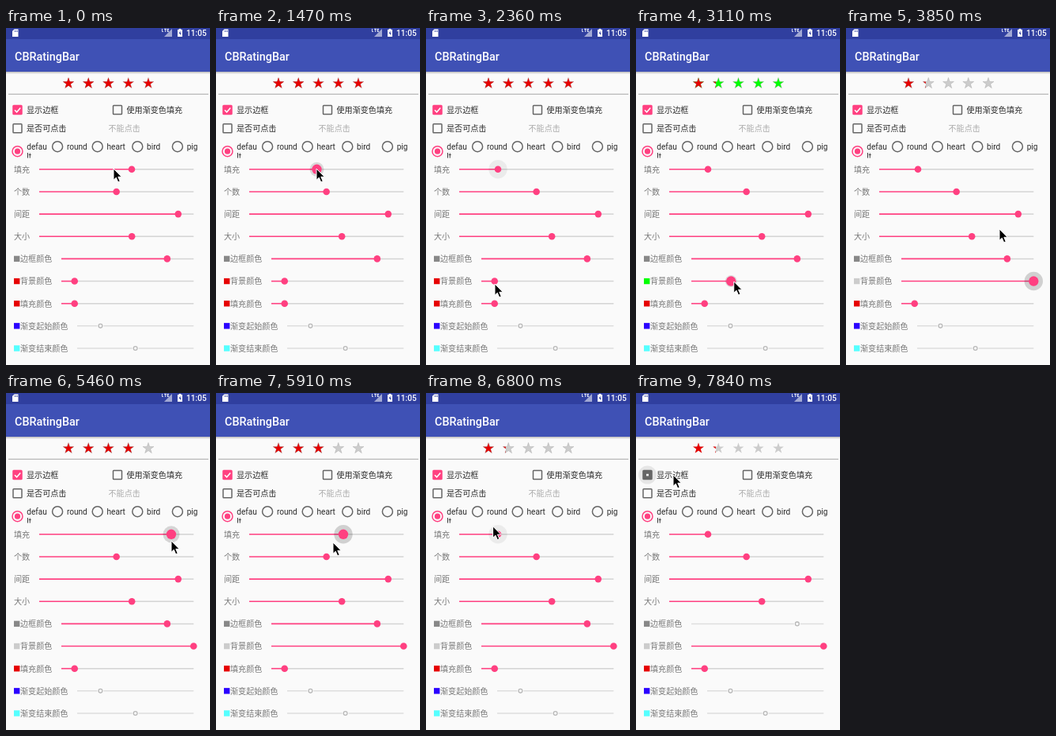
These frames come from a looping animation (258 px wide and 424 px high, 7.99 s). An HTML page:

```html
<!DOCTYPE html>
<html lang="zh-CN">
<head>
<meta charset="utf-8">
<title>CBRatingBar</title>
<style>
html, body { margin: 0; width: 100%; height: 100%; overflow: hidden; background: #fafafa; }
svg { display: block; width: 258px; height: 424px; }
text { font: 10.1px Roboto, "Noto Sans CJK SC", "Noto Sans CJK", sans-serif; fill: #2b2b2b; }
.label { fill: #777; }
.hint { fill: #ababab; }
.title { font-size: 14.4px; font-weight: 500; fill: #fff; }
.clock { font-weight: 500; fill: #fff; }
</style>
</head>
<body>
<svg id="stage" viewBox="0 0 258 424">
  <defs>
    <linearGradient id="shade" x2="0" y2="1">
      <stop stop-color="#000" stop-opacity=".26"/>
      <stop offset="1" stop-color="#000" stop-opacity="0"/>
    </linearGradient>
    <clipPath id="filled"><rect id="fillClip" x="70" y="60" height="20"/></clipPath>
    <clipPath id="radioRow"><rect y="140" width="258" height="23.5"/></clipPath>
  </defs>
</svg>
<script>
const LOOP = 7990, TICK = 147.96, LAST = 53;
const PINK = '#ff4081', GREY = '#666';
const PALETTE = ['#000', '#e60000', '#2a00ff', '#0f0', '#ff0', '#5ff', '#f0f', '#fff', '#888', '#444', '#ccc'];
const stage = document.getElementById('stage');

function add(tag, attrs, parent = stage) {
  const node = document.createElementNS('http://www.w3.org/2000/svg', tag);
  set(node, attrs);
  return parent.appendChild(node);
}
function set(node, attrs) {
  for (const key in attrs) node.setAttribute(key, attrs[key]);
}
function rect(x, y, width, height, fill, more) {
  return add('rect', { x, y, width, height, fill, ...more });
}
function circle(cx, cy, r, fill, more) {
  return add('circle', { cx, cy, r, fill, ...more });
}
function text(x, y, string, style = '', more) {
  const node = add('text', { x, y, class: style, ...more });
  node.textContent = string;
  return node;
}

// App bar and status bar
rect(0, 55, 258, 3, 'url(#shade)');
rect(0, 0, 258, 55, '#3f51b5');
rect(0, 0, 258, 14, '#303f9f');
text(11, 40.5, 'CBRatingBar', 'title');
text(228, 10, '11:05', 'clock');
add('path', { d: 'M10.5 1.5H15.5V11H8V4Z', fill: '#fff' });
add('path', { d: 'M11 3V5M12.7 3V5M14.3 3V5', stroke: '#303f9f', 'stroke-width': .7 });
add('path', { d: 'M210 1V11H200Z', fill: '#fff', opacity: .55 });
add('path', { d: 'M197.5 1V4.5H199M200 1.3H203M201.5 1V5M206 1.3H204V4.5H206M204 2.8H206', stroke: '#fff', 'stroke-width': .8, fill: 'none' });
add('path', { d: 'M218.7 1H221.3V2H223V11H217V2H218.7Z', fill: '#fff' });
add('path', { d: 'M220.5 3.5L218.6 7H220V9.5L221.6 6H220.5Z', fill: '#303f9f' });

// Rating bar
function starPath(cx, cy) {
  const points = Array.from({ length: 10 }, (_, i) => {
    const r = i % 2 ? 2.85 : 7.3, a = i * Math.PI / 5;
    return (cx + r * Math.sin(a)).toFixed(2) + ' ' + (cy - r * Math.cos(a)).toFixed(2);
  });
  return 'M' + points.join('L') + 'Z';
}
const stars = [0, 1, 2, 3, 4].map(i => starPath(79 + i * 25.25, 69.7)).join('');
const starBack = add('path', { d: stars });
add('path', { d: stars, fill: '#e60000', 'clip-path': 'url(#filled)' });
const starEdge = add('path', { d: stars, fill: 'none', stroke: '#888', 'stroke-width': .5, opacity: .55 });
const fillClip = document.getElementById('fillClip');
rect(3, 82.6, 253, 1.4, '#bdbdbd');

// Check boxes
const boxHalo = circle(14.5, 103, 11.5, '#000', { opacity: .08 });
const box = (x, y) => rect(x - 5.5, y - 5.5, 11, 11, 'none', { rx: .8, stroke: GREY, 'stroke-width': 1.5 });
const borderBox = box(14.5, 103);
const tick = add('path', { d: 'M11 103.2L13.6 105.8L18.3 100.6', fill: 'none', stroke: '#fff', 'stroke-width': 1.5 });
const boxHole = rect(13, 101.8, 3, 2.6, '#f4f4f4');
box(141, 103);
box(14.5, 126.3);
text(26, 106.8, '显示边框');
text(152.5, 106.8, '使用渐变色填充');
text(26, 130, '是否可点击');
text(129.5, 130, '不能点击', 'hint');

// Radio buttons
['defau', 'round', 'heart', 'bird', 'pig'].forEach((name, i) => {
  const x = 14.5 + i * 50.6, y = i ? 149.2 : 155.2;
  circle(x, y, 6.5, 'none', { stroke: i ? GREY : PINK, 'stroke-width': 1.5 });
  if (!i) circle(x, y, 3.6, PINK);
  text(x + 11.8, 153, name);
});
text(26.3, 164.8, 'lt', '', { 'clip-path': 'url(#radioRow)' });

// Sliders
function slider(row, name, left, part, color) {
  const y = 177.8 + row * 28.15, right = 237.3;
  const swatch = color && rect(10, y - 3.7, 7.4, 7.4, color);
  text(color ? 18 : 10, y + 3.8, name, 'label');
  const rail = add('path', { fill: 'none', 'stroke-width': 1.5 });
  const bar = add('path', { fill: 'none', stroke: PINK, 'stroke-width': 1.6 });
  const halo = circle(0, y, 0, '#000');
  const thumb = circle(0, y, 4.3, PINK);
  function update(part, { off = false, pressed = false, haloSize = 0, haloAlpha = 0 } = {}) {
    const x = left + (right - left) * part;
    set(rail, {
      d: off ? `M${left} ${y}H${x - 4}M${x + 4} ${y}H${right}` : `M${x} ${y}H${right}`,
      stroke: off ? '#dedede' : '#d4d4d4'
    });
    set(bar, { d: `M${left} ${y}H${x}`, opacity: off ? 0 : 1 });
    set(halo, { cx: x, r: haloSize, opacity: haloAlpha });
    set(thumb, {
      cx: x, r: off ? 2.4 : pressed ? 6.2 : 4.3, fill: off ? '#fafafa' : PINK,
      stroke: off ? '#b8b8b8' : 'none', 'stroke-width': 1.3
    });
  }
  update(part);
  return { update, swatch };
}
const fillSlider = slider(0, '填充', 42, .6);
slider(1, '个数', 42, .5);
slider(2, '间距', 42, .9);
slider(3, '大小', 42, .6);
const edgeSlider = slider(4, '边框颜色', 70, .8, PALETTE[8]);
const backSlider = slider(5, '背景颜色', 70, .1, PALETTE[1]);
slider(6, '填充颜色', 70, .1, PALETTE[1]);
slider(7, '渐变起始颜色', 90, .2, PALETTE[2]).update(.2, { off: true });
slider(8, '渐变结束颜色', 90, .5, PALETTE[5]).update(.5, { off: true });

const cursor = add('path', {
  d: 'M0 0V14.3L3.3 11.2L5.7 16.8L8.2 15.7L5.8 10.3H10.2Z',
  fill: '#000', stroke: '#fff', 'stroke-width': 1, 'stroke-linejoin': 'round'
});

// Motion: [tick, values...], linear between ticks
const cursorPath = [
  [0, 136, 177], [2, 107, 178], [3, 107, 178], [4, 122, 180], [6, 159, 177], [8, 159, 177],
  [9, 146, 177], [10, 127, 177], [12, 91, 178], [13, 91, 178], [15, 110, 255], [16, 87, 322],
  [18, 86, 319], [20, 86, 319], [24, 237, 319], [25, 237, 319], [26, 194, 253], [29, 146, 196],
  [33, 136, 183], [34, 136, 183], [37, 209, 186], [40, 148, 188], [41, 135, 187], [44, 94, 184],
  [45, 94, 184], [50, 47, 103]
];
const fillPath = [
  [0, 159], [8, 159], [9, 146], [10, 127.5], [12, 91], [32, 91], [33, 130],
  [34, 130], [37, 209], [40, 161], [41, 135], [44, 94], [45, 94], [46, 91]
];
const backPath = [[20, .1], [24, 1]];

function at(path, k) {
  const i = path.findIndex(p => p[0] > k);
  if (i === 0) return path[0].slice(1);
  if (i < 0) return path[path.length - 1].slice(1);
  const a = path[i - 1], b = path[i], u = (k - a[0]) / (b[0] - a[0]);
  return a.slice(1).map((v, j) => v + (b[j + 1] - v) * u);
}
function touch(k, ...spans) {
  for (const [down, up] of spans) {
    if (k < down || k > up + 1) continue;
    const n = k - down, pressed = k < up;
    return {
      pressed,
      haloSize: Math.min(11.7, 6 + n * 1.5),
      haloAlpha: pressed ? Math.min(.17, .1 + n * .015) : .06 - (k - up) * .03
    };
  }
}

let shown = -1;
function draw(k) {
  const [x, y] = at(cursorPath, k);
  const part = (at(fillPath, k)[0] - 42) / 195.3;
  const back = Math.round(at(backPath, k)[0] * 10);
  const tapped = k >= LAST;
  set(cursor, { transform: `translate(${x} ${y})` });
  fillSlider.update(part, touch(k, [8, 16], [34, 46]));
  backSlider.update(back / 10, touch(k, [20, 27]));
  edgeSlider.update(.8, { off: tapped });
  set(backSlider.swatch, { fill: PALETTE[back] });
  set(starBack, { fill: PALETTE[back] });
  set(fillClip, { width: 2 + 115 * part });
  set(starEdge, { visibility: tapped ? 'hidden' : 'visible' });
  set(borderBox, { fill: tapped ? GREY : PINK, stroke: tapped ? GREY : PINK });
  set(tick, { visibility: tapped ? 'hidden' : 'visible' });
  for (const node of [boxHalo, boxHole]) set(node, { visibility: tapped ? 'visible' : 'hidden' });
}
const start = performance.now();
function frame() {
  const time = Math.max(0, performance.now() - start) % LOOP;
  const k = Math.min(LAST, Math.floor((time + 14) / TICK));
  if (k !== shown) draw(shown = k);
  requestAnimationFrame(frame);
}
frame();
</script>
</body>
</html>
```
